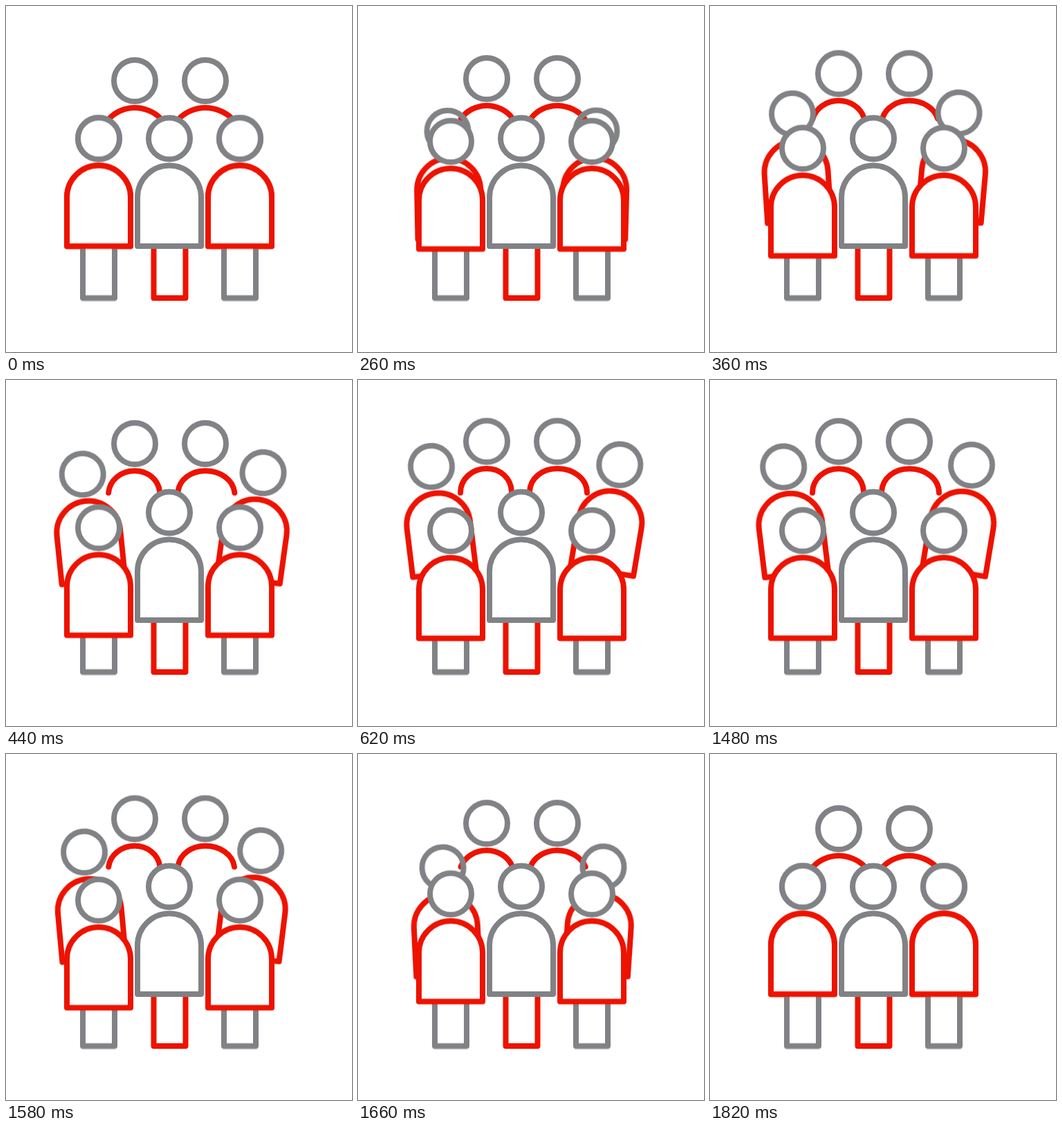
An HTML page that plays this animation: 500 by 500 pixels, repeating every 2.12 s.

```html
<!DOCTYPE html>
<html lang="en">
<head>
<meta charset="utf-8">
<title>Growing group</title>
<style>
  html, body { margin: 0; width: 100%; height: 100%; overflow: hidden; background: #fff; }
  svg { display: block; width: 100%; height: 100%; }
  svg * { stroke-width: 8; stroke-linecap: round; stroke-linejoin: round; }
  svg { --fill: #fff; }
  .red { --body: #ee1200; --legs: #808285; }
  .grey { --body: #808285; --legs: #ee1200; }
  .outline { --fill: none; }
  .head { fill: var(--fill); stroke: #808285; }
  .body { fill: var(--fill); stroke: var(--body); }
  .legs { fill: var(--fill); stroke: var(--legs); }
  .shoulders { fill: none; stroke: #ee1200; }

  .move { animation: move 2120ms infinite; }
  .bend { animation: bend 2120ms infinite; }
  .rise { --to: translate(0, -19.3px); }
  .duck { --to: translate(0, 26.3px); }
  .lean-left { --to: translate(-28px, -66.5px) rotate(-7deg); }
  .lean-right { --to: translate(40.3px, -69px) rotate(9.5deg); }

  /* Spread out from 160 to 545 ms, close up from 1460 to 1820 ms. */
  @keyframes move {
    0%, 85.849%, 100% { transform: translate(0, 0) rotate(0deg); }
    7.547% { transform: translate(0, 0) rotate(0deg); animation-timing-function: cubic-bezier(.37, 0, .63, 1); }
    25.708% { transform: var(--to); }
    68.868% { transform: var(--to); animation-timing-function: cubic-bezier(.37, 0, .63, 1); }
  }
  @keyframes bend {
    0%, 85.849%, 100% { d: var(--low); }
    7.547% { d: var(--low); animation-timing-function: cubic-bezier(.37, 0, .63, 1); }
    25.708% { d: var(--high); }
    68.868% { d: var(--high); animation-timing-function: cubic-bezier(.37, 0, .63, 1); }
  }
  .left {
    --low: path("M149 163 C158 153 172 147 186 147 C200 147 214 153 223 162");
    --high: path("M148 163 C148 143 165 128 186 128 C206 128 221 142 222 161");
  }
  .right {
    --low: path("M251 162 C260 153 274 147 288 147 C302 147 317 153 327 163");
    --high: path("M248 161 C249 142 266 128 288 128 C312 128 331 143 331 163");
  }
</style>
</head>
<body>
<svg viewBox="0 0 500 500">
  <defs>
    <!-- Each part is placed relative to the centre of the head. -->
    <circle id="head" class="head" r="30"/>
    <path id="legs" class="legs" d="M-23 150 V230.5 H23 V150 Z"/>
    <g id="torso">
      <path class="body" d="M-46 155.5 V85 A46 46 0 0 1 46 85 V155.5 Z"/>
      <use href="#head"/>
    </g>
  </defs>

  <path class="shoulders bend left" d="M149 163 C158 153 172 147 186 147 C200 147 214 153 223 162"/>
  <path class="shoulders bend right" d="M251 162 C260 153 274 147 288 147 C302 147 317 153 327 163"/>
  <g transform="translate(186 108)"><use href="#head" class="move rise"/></g>
  <g transform="translate(288 108)"><use href="#head" class="move rise"/></g>

  <g class="red outline" transform="translate(134 191.5)"><use href="#torso" class="move lean-left"/></g>
  <g class="red outline" transform="translate(338 191.5)"><use href="#torso" class="move lean-right"/></g>

  <g class="red" transform="translate(134 191.5)">
    <use href="#legs"/>
    <use href="#torso" class="move duck"/>
  </g>
  <g class="red" transform="translate(338 191.5)">
    <use href="#legs"/>
    <use href="#torso" class="move duck"/>
  </g>
  <g class="grey" transform="translate(236 191.5)">
    <use href="#legs" x=".5"/>
    <use href="#torso"/>
  </g>
</svg>
</body>
</html>
```
